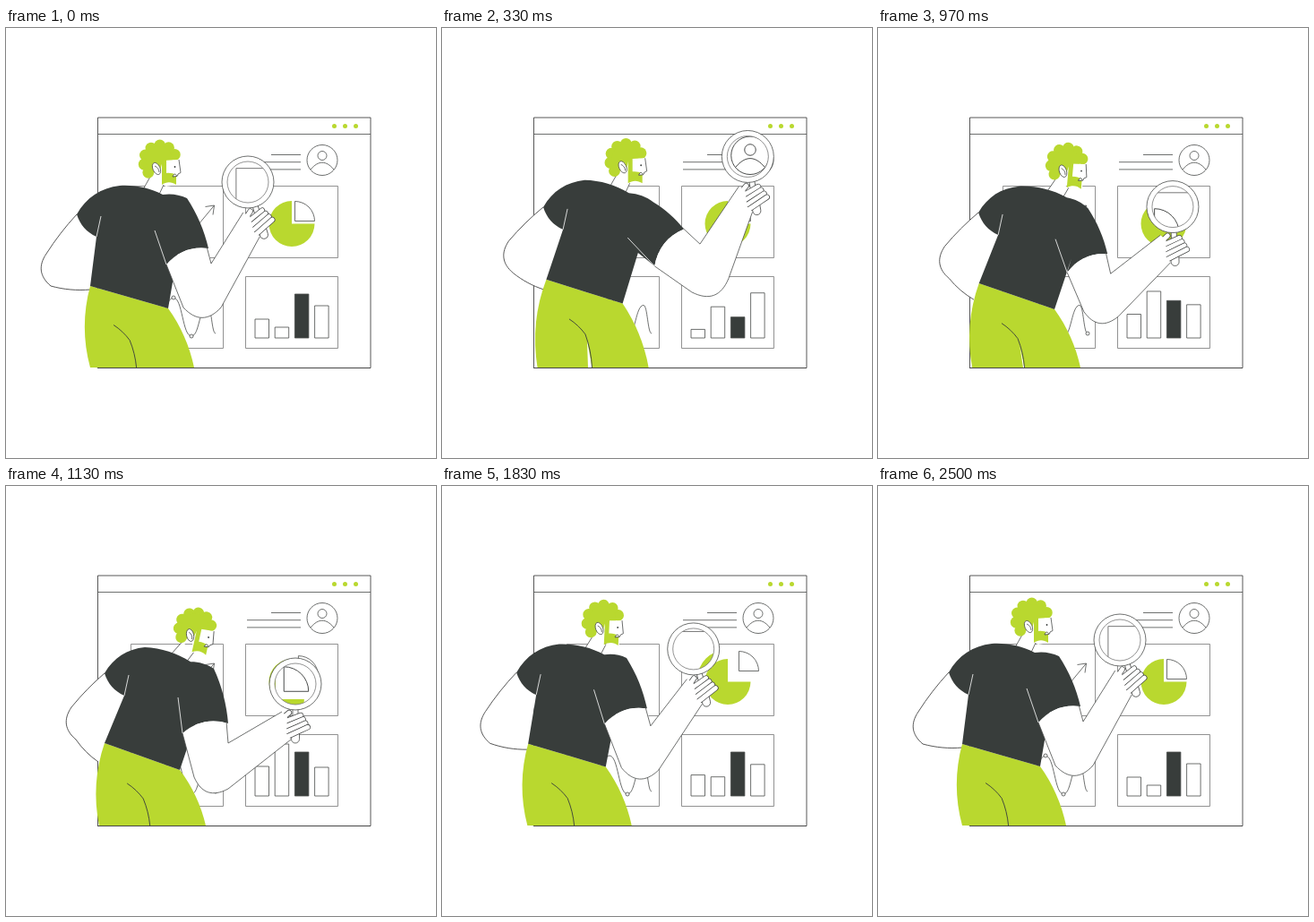
An HTML page with a canvas for the animation above (2530 ms loop, 480 by 480 pixels).

```html
<!DOCTYPE html>
<html lang="en">
<head>
<meta charset="utf-8">
<title>Dashboard review</title>
<style>
  html, body { margin: 0; width: 100%; height: 100%; overflow: hidden; background: #fff; }
  canvas { display: block; width: 480px; height: 480px; }
</style>
</head>
<body>
<canvas id="stage"></canvas>
<script>
const LOOP = 2530, FLOOR = 379;
const GREEN = '#b9d82f', DARK = '#383d3b', LINE = '#4a4c4b', SOFT = '#777';
const canvas = document.getElementById('stage');
const ctx = canvas.getContext('2d');
const dpr = window.devicePixelRatio || 1;
canvas.width = canvas.height = 480 * dpr;

// Each joint has three places: looking left, top right and centre.
const BODY = {
  back:     [[127, 176], [163, 169], [155, 180]],
  cuff:     [[79, 208], [117, 199], [110, 209]],
  hemL:     [[94, 288], [119, 280], [110, 287]],
  hemR:     [[181, 313], [204, 307], [194, 317]],
  pit:      [[179, 264], [244, 266], [197, 276]],
  sleeve:   [[226, 246], [275, 222], [248, 265]],
  shoulder: [[202, 190], [240, 195], [232, 204]],
  fold:     [[166, 226], [212, 235], [192, 236]],
  foot:     [[94, FLOOR], [108, FLOOR], [104, FLOOR]],
  elbow:    [[45, 252], [78, 236], [73, 247]],
  wrist:    [[94, 292], [116, 292], [103, 308]]
};
const REACH = {
  lens:  [[270, 172], [345, 142], [323, 221]],
  view:  [[-10, -21], [-12, -5.5], [-17, 20]],
  turn:  [[-17], [-9], [0]],
  inner: [[229, 263], [291, 240], [248, 287]],
  low:   [[198, 312], [283, 294], [210, 325]],
  fore:  [[240, 312], [324, 278], [248, 338]],
  bars:  [[21, 12, 49, 36], [9, 36, 22, 51], [33, 58, 49, 32]]
};
const HEAD = {
  ear: [[168, 157], [207, 155], [205.5, 167]],
  nod: [[0], [0], [13]]
};

const STARTS = [0, 740, 1560];
const PACE = { reach: [430, 390, 430], body: [470, 400, 400], head: [490, 500, 430] };

const rad = Math.PI / 180;
const clamp = v => Math.min(1, Math.max(0, v));
const mix = (a, b, k) => a.map((n, i) => n + (b[i] - n) * k);
const add = ([x, y], dx, dy) => [x + dx, y + dy];
const ease = u => u < .5 ? 4 * u ** 3 : 1 - 4 * (1 - u) ** 3;
const phase = (t, pace) => STARTS.reduce((sum, s, i) => sum + ease(clamp((t - s) / pace[i])), 0);

function pose(joints, v) {
  const i = Math.floor(v), out = {};
  for (const name in joints) out[name] = mix(joints[name][i % 3], joints[name][(i + 1) % 3], v - i);
  return out;
}

function turned([x, y], deg, [px, py]) {
  const c = Math.cos(deg * rad), s = Math.sin(deg * rad);
  return [x + px * c - py * s, y + px * s + py * c];
}

function within([x, y], deg, paintPart) {
  ctx.save();
  ctx.translate(x, y);
  ctx.rotate(deg * rad);
  paintPart();
  ctx.restore();
}

function paint(fill, stroke, width = .8) {
  if (fill) { ctx.fillStyle = fill; ctx.fill(); }
  if (stroke) { ctx.strokeStyle = stroke; ctx.lineWidth = width; ctx.stroke(); }
}

// Steps are [x, y] for a straight edge or [[x, y], bow] for an arched one.
// A positive bow arches to the right of the direction of travel.
function outline(steps, fill, stroke, width) {
  let [ax, ay] = steps[0];
  ctx.beginPath();
  ctx.moveTo(ax, ay);
  for (const step of steps.slice(1)) {
    const [[bx, by], bow] = Array.isArray(step[0]) ? step : [step, 0];
    const dx = bx - ax, dy = by - ay, nx = -dy * bow, ny = dx * bow;
    ctx.bezierCurveTo(ax + dx / 3 + nx, ay + dy / 3 + ny, bx - dx / 3 + nx, by - dy / 3 + ny, bx, by);
    [ax, ay] = [bx, by];
  }
  paint(fill, stroke, width);
}

function circle(x, y, r, fill, stroke) {
  ctx.beginPath();
  ctx.arc(x, y, r, 0, Math.PI * 2);
  paint(fill, stroke);
}

function box(x, y, w, h, fill, stroke, width) {
  ctx.beginPath();
  ctx.rect(x, y, w, h);
  paint(fill, stroke, width);
}

const line = (a, b, color = LINE, width) => outline([a, b], null, color, width);

function sector(x, y, r, from, to, fill, stroke) {
  ctx.beginPath();
  ctx.moveTo(x, y);
  ctx.arc(x, y, r, from * rad, to * rad);
  ctx.closePath();
  paint(fill, stroke);
}

function arrow(t) {
  const k = Math.max(1 - clamp((t - 1450) / 350), clamp((t - 2150) / 320));
  const tip = mix([186, 254], [232.5, 198], k);
  line([186, 254], tip);
  outline([add(tip, -10, 1.5), tip, add(tip, -1.5, 10.5)], null, LINE);
}

function wave(t) {
  const knots = [[166, 340], [187, 301], [207, 344], [225, 309.5], [234, 341]];
  ctx.beginPath();
  ctx.moveTo(...knots[0]);
  for (let i = 1; i < knots.length; i++) {
    const [ax, ay] = knots[i - 1], [bx, by] = knots[i], half = (bx - ax) / 2;
    ctx.bezierCurveTo(ax + half, ay, bx - half, by, bx, by);
  }
  paint(null, LINE);
  [[1, 2250], [2, 1600], [4, 450]].forEach(([i, on]) => {
    const age = (t - on + LOOP) % LOOP;
    const r = 2 * Math.min(clamp(age / 200), clamp((1200 - age) / 200));
    if (r > 0) circle(...knots[i], r, '#fff', LINE);
  });
}

function board(t, bars) {
  box(102.5, 100, 304.5, 279.5, '#fff', '#444', .9);
  line([102, 118.5], [407, 118.5]);
  for (let i = 0; i < 3; i++) circle(366.5 + 12 * i, 109.5, 2.5, GREEN);

  for (let i = 0; i < 3; i++) line([i ? 269 : 296, 141.5 + 8.2 * i], [329, 141.5 + 8.2 * i]);
  circle(353, 147.5, 17, null, LINE);
  circle(353, 142.5, 5, null, LINE);
  outline([[340, 158], [[366, 158], -.4]], null, LINE);

  for (const x of [139.5, 267.5])
    for (const y of [176.5, 277.5]) box(x, y, 103, 80, null, SOFT);
  arrow(t);
  wave(t);

  const out = 9 * Math.min(clamp((t - 600) / 1230), clamp((2500 - t) / 670));
  sector(319, 218.5, 25.5, 0, 270, GREEN);
  sector(322.5 + out, 215.5 - out, 22, -90, 0, null, LINE);

  bars.forEach((h, i) => box(278 + 22.2 * i, 346 - h, 15.5, h, i === 2 ? DARK : '#fff', LINE));
}

function backArm(b) {
  const bend = [b.cuff, [b.elbow, .03], [add(b.elbow, 5, 36), .3], [b.wrist, .06]];
  outline([...bend, add(b.cuff, 22, 25)], '#fff');
  outline(bend, null, '#444', .9);
}

function pants(b, v) {
  outline([b.hemL, b.hemR, [[b.hemR[0] + 29, FLOOR], -.07], b.foot, [b.hemL, -.09]], GREEN);
  const seam = add(mix(b.hemL, b.hemR, .3), 0, 36);
  const knee = add(seam, 18, 17), end = [knee[0] + 7.5, FLOOR];
  const gap = 5 * clamp(1 - Math.abs(v - 1));
  outline([add(knee, 2, 7), end, add(end, -gap, 0)], '#fff');
  outline([seam, [knee, -.06], [end, -.05]], null, DARK, .9);
  line([102, FLOOR + .5], [407, FLOOR + .5], '#444', .9);
}

function shirt(b, collar) {
  const inner = add(b.cuff, 22, 25);
  outline([b.back, [b.cuff, .17], [inner, .15], b.hemL, b.hemR, mix(b.hemR, b.shoulder, .5), b.pit,
    [b.sleeve, -.18], [b.shoulder, .06], [collar, .1], [b.back, .09]], DARK);
  line(add(inner, 5, -23), inner, '#fff');
  line(b.fold, b.pit, '#fff');
}

function neck() {
  outline([[-7, 9], [-16, 25], [-12, 34], [1, 33], [8, 18]], '#fff', LINE);
}

function face() {
  for (let i = 0; i < 7; i++) {
    const a = -(25 + 33 * i) * rad;
    circle(4 + 18 * Math.cos(a), -8 + 18 * Math.sin(a), 6.4, GREEN);
  }
  circle(3, -10, 15, GREEN);
  outline([[7, -9], [24, -10], [27, 4], [24, 6], [23, 18], [10, 20], [3, 6]], '#fff');
  outline([[25, -10], [27, 4.5], [24, 6], [23.5, 8]], null, LINE);
  outline([[6, -10], [11, -10], [11, 5], [[22, 7], -.1], [22, 18], [[6, 18], .22]], GREEN);
  outline([[18, 9], [23, 8.5], [[18, 9], .7]], '#fff', DARK);
  circle(20.5, -2, .9, DARK);
  ctx.beginPath();
  ctx.ellipse(0, 0, 4, 7, -.42, 0, Math.PI * 2);
  paint('#fff', LINE);
  outline([[-2, -3], [[3, 4], -.2]], null, LINE);
}

function handle() {
  box(-3, 28, 6, 10, '#fff', LINE);
  ctx.beginPath();
  ctx.roundRect(-4.5, 36, 9, 30, 4.5);
  paint('#fff', LINE);
}

function glass(r, t) {
  const [x, y] = r.lens;
  within(r.lens, r.turn[0], handle);
  circle(x, y, 29, '#fff', LINE);
  ctx.save();
  ctx.beginPath();
  ctx.arc(x, y, 23, 0, Math.PI * 2);
  ctx.clip();
  ctx.translate(x + r.view[0], y + r.view[1]);
  ctx.scale(1.25, 1.25);
  ctx.translate(-x, -y);
  board(t, r.bars);
  ctx.restore();
  circle(x, y, 23, null, SOFT);
}

function fingers() {
  ctx.lineCap = 'round';
  const finger = (a, b) => { line(a, b, LINE, 6.4); line(a, b, '#fff', 4.9); };
  finger([-14, 38], [-7, 32]);
  for (let i = 0; i < 4; i++) finger([-12, 42 + 6 * i], [6 + 2.6 * i, 35 + 4.4 * i]);
}

function frontArm(b, r) {
  const grip = p => turned(r.lens, r.turn[0], p);
  const top = grip([-15, 31]), heel = grip([-5, 62]);
  const under = [heel, r.fore, [r.low, -.36], b.pit];
  outline([b.pit, [b.sleeve, -.18], r.inner, top, grip([-9, 37]), grip([-10, 55]), ...under], '#fff');
  outline([add(b.sleeve, -2, -2), r.inner, top], null, LINE);
  outline(under, null, LINE);
}

function draw(t) {
  const bodyV = phase(t, PACE.body);
  const b = pose(BODY, bodyV);
  const r = pose(REACH, phase(t, PACE.reach));
  const { ear, nod: [nod] } = pose(HEAD, phase(t, PACE.head));

  ctx.setTransform(dpr, 0, 0, dpr, 0, 0);
  ctx.fillStyle = '#fff';
  ctx.fillRect(0, 0, 480, 480);
  board(t, r.bars);
  backArm(b);
  pants(b, bodyV);
  within(ear, nod, neck);
  shirt(b, turned(ear, nod, [7, 29]));
  within(ear, nod, face);
  glass(r, t);
  within(r.lens, r.turn[0], fingers);
  frontArm(b, r);
}

const start = performance.now();
function tick() {
  draw((performance.now() - start) % LOOP);
  requestAnimationFrame(tick);
}
tick();
</script>
</body>
</html>
```
